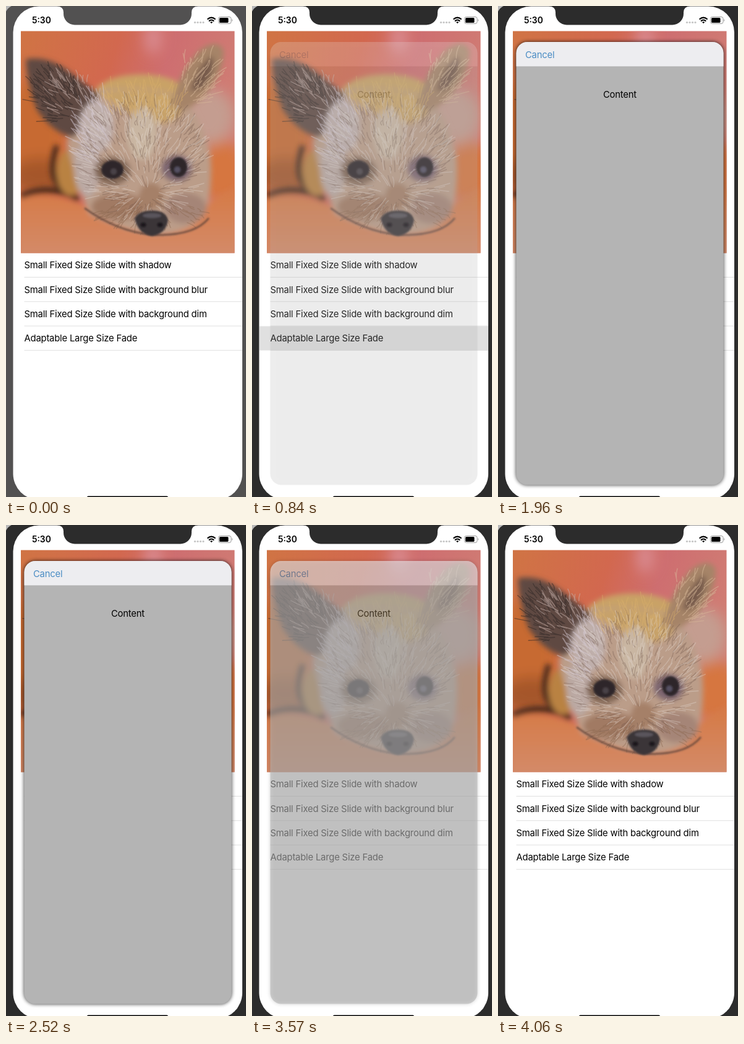
Recreate the animation shown at these times as an HTML page. Size 388 by 792 pixels, loop 4.13 s.

```html
<!DOCTYPE html>
<html lang="en">
<head>
<meta charset="utf-8">
<title>Modal fade</title>
<style>
html, body { margin: 0; width: 100%; height: 100%; overflow: hidden; background: #fff; }
svg { display: block; width: 388px; height: 792px; }
text { font: 14.8px Inter, Roboto, sans-serif; letter-spacing: -.19px; }
.clock { font-size: 13.8px; font-weight: 600; letter-spacing: 0; }
</style>
</head>
<body>
<svg viewBox="0 0 388 792">
  <defs>
    <filter id="soft" x="-30%" y="-30%" width="160%" height="160%"><feGaussianBlur stdDeviation="4"/></filter>
    <filter id="wide" x="-50%" y="-50%" width="200%" height="200%"><feGaussianBlur stdDeviation="11"/></filter>
    <filter id="edge"><feGaussianBlur stdDeviation="1.6"/></filter>
    <filter id="halo" x="-5%" y="-5%" width="110%" height="110%"><feGaussianBlur stdDeviation="3"/></filter>
    <linearGradient id="sofa" x2="1" y2=".35">
      <stop stop-color="#d07444"/><stop offset=".42" stop-color="#d2684f"/>
      <stop offset=".65" stop-color="#ce6e70"/><stop offset="1" stop-color="#d07e74"/>
    </linearGradient>
    <linearGradient id="blanket" x2="0" y2="1">
      <stop stop-color="#d67a45"/><stop offset="1" stop-color="#d38b6a"/>
    </linearGradient>
    <clipPath id="photo"><rect x="24" y="40.5" width="345.5" height="358"/></clipPath>
    <clipPath id="card"><rect x="29.5" y="58" width="335" height="714.5" rx="18"/></clipPath>
  </defs>

  <rect id="bezel" width="388" height="792"/>
  <path d="M0 0H9Q3 3 0 9Z" fill="#b9b9b9"/>
  <rect x="11.5" y=".5" width="370.5" height="796" rx="42" fill="#fff"/>
  <path id="notch" d="M82 0Q93 1 93 10V12A18 18 0 0 0 111 30.5H282A18 18 0 0 0 300 12V10Q300 1 311 0Z"/>

  <text class="clock" x="42" y="28">5:30</text>
  <g fill="#c4c4c4">
    <circle cx="305.5" cy="26.5" r="1.6"/><circle cx="310" cy="26.5" r="1.6"/>
    <circle cx="314.5" cy="26.5" r="1.6"/><circle cx="319" cy="26.5" r="1.6"/>
  </g>
  <g fill="none" stroke="#000" stroke-width="2">
    <path d="M325.6 21.6Q332 15.6 338.6 21.6M328 24.4Q332 20.6 336.3 24.4"/>
    <path d="M330 26L332.1 28.2L334.3 26Q332.1 24.4 330 26Z" fill="#000" stroke="none"/>
  </g>
  <rect x="343.5" y="17.5" width="20.5" height="11" rx="3" fill="none" stroke="#999"/>
  <rect x="345" y="19" width="14.5" height="8" rx="1.6"/>
  <path d="M365.3 21V25Q367.5 23 365.3 21Z" fill="#999"/>

  <g clip-path="url(#photo)">
    <rect x="24" y="40" width="346" height="359" fill="url(#sofa)"/>
    <g filter="url(#wide)">
      <ellipse cx="45" cy="205" rx="52" ry="85" fill="#c76a30"/>
      <ellipse cx="55" cy="275" rx="48" ry="30" fill="#a5562a"/>
      <ellipse cx="350" cy="268" rx="40" ry="50" fill="#d6763f"/>
      <ellipse cx="238" cy="52" rx="14" ry="26" fill="#d98a90"/>
      <ellipse cx="326" cy="178" rx="44" ry="46" fill="#c49d90"/>
    </g>
    <g filter="url(#soft)">
      <path d="M20 312Q70 296 135 326L330 318Q350 300 375 292V405H20Z" fill="url(#blanket)"/>
      <path d="M24 307Q70 284 118 312M82 225Q66 275 90 294" fill="none" stroke="#4a2a1b" stroke-width="9"/>
      <ellipse cx="105" cy="268" rx="23" ry="38" fill="#b98243"/>
      <ellipse cx="218" cy="144" rx="76" ry="34" fill="#c9a266"/>
      <path d="M135 140Q205 122 285 145Q320 185 330 240Q335 290 322 335Q295 368 240 368Q190 362 135 336Q112 280 98 222Q108 175 135 140Z" fill="#bb9d89"/>
      <path d="M150 142Q210 122 288 150Q290 190 240 190Q185 165 150 142Z" fill="#c7a26a"/>
      <path d="M32 86Q70 78 112 113L150 142Q140 182 108 212Q76 205 50 168Q34 128 32 86Z" fill="#5f4a43"/>
      <path d="M266 165Q276 112 312 72Q342 50 352 72Q351 108 331 132Q312 158 288 168Z" fill="#a68468"/>
      <path d="M298 138Q308 98 334 80Q340 106 318 132Z" fill="#765a4c"/>
      <ellipse cx="146" cy="195" rx="28" ry="42" fill="#bfafab"/>
      <ellipse cx="220" cy="206" rx="24" ry="42" fill="#c9b6a2"/>
      <ellipse cx="131" cy="262" rx="21" ry="46" fill="#bba9a3"/>
      <ellipse cx="172" cy="266" rx="29" ry="23" fill="#806553"/>
      <ellipse cx="276" cy="262" rx="25" ry="22" fill="#7c6570"/>
      <ellipse cx="182" cy="324" rx="44" ry="22" fill="#a17a63"/>
      <ellipse cx="290" cy="326" rx="34" ry="25" fill="#a58577"/>
      <ellipse cx="235" cy="307" rx="20" ry="22" fill="#a58068"/>
    </g>
    <g id="fur" fill="none" stroke-width="1.4" stroke-linecap="round"></g>
    <path d="M127 326Q180 364 236 369Q304 372 328 342" fill="none" stroke="#62453a" stroke-width="2.5" filter="url(#edge)"/>
    <g filter="url(#edge)" fill="#2f282a">
      <ellipse cx="172" cy="264" rx="18" ry="15"/>
      <ellipse cx="279" cy="260" rx="14" ry="16"/>
      <path d="M208 343Q214 330 237 330Q259 330 262 346Q258 368 236 371Q214 368 208 343Z" fill="#3a3439"/>
      <ellipse cx="222" cy="353" rx="5" ry="4" fill="#1c191c"/><ellipse cx="249" cy="353" rx="5" ry="4" fill="#1c191c"/>
      <ellipse cx="236" cy="338" rx="15" ry="4" fill="#5a555b"/>
      <circle cx="174" cy="267" r="5" fill="#4a4347"/><circle cx="277" cy="264" r="5" fill="#545062"/>
    </g>
  </g>

  <rect id="press" x="12" y="516.5" width="370" height="39" fill="#d9d9d9"/>
  <g id="rows"></g>
  <rect x="131" y="790.5" width="131" height="4" rx="2"/>

  <rect id="shade" x="29.5" y="58" width="335" height="714.5" rx="18" filter="url(#halo)"/>
  <g id="modal">
    <g clip-path="url(#card)">
      <rect x="29" y="58" width="336" height="715" fill="#b4b4b4"/>
      <rect x="29" y="58" width="336" height="39.3" fill="#ededf0"/>
    </g>
    <text x="44" y="83.5" fill="#4a8cc4">Cancel</text>
    <text x="197" y="148" text-anchor="middle">Content</text>
  </g>
</svg>
<script>
const LOOP = 4130, STEP = 70;
const $ = id => document.getElementById(id);

$('rows').innerHTML = [
  'Small Fixed Size Slide with shadow',
  'Small Fixed Size Slide with background blur',
  'Small Fixed Size Slide with background dim',
  'Adaptable Large Size Fade'
].map((label, i) => {
  const y = 39.3 * i;
  return `<text x="29.5" y="${423.3 + y}">${label}</text>
    <path d="M29.5 ${437.5 + y}H382" stroke="#e0e0e0"/>`;
}).join('');

let seed = 7;
const rand = () => (seed = seed * 16807 % 2147483647) / 2147483647;

// Seeded hairs inside an ellipse, fanning out from the root point
function hairs(color, count, [cx, cy, rx, ry], [rootX, rootY], length) {
  let d = '';
  for (let i = 0; i < count; i++) {
    const turn = rand() * Math.PI * 2, reach = Math.sqrt(rand());
    const x = cx + Math.cos(turn) * rx * reach, y = cy + Math.sin(turn) * ry * reach;
    const angle = Math.atan2(y - rootY, x - rootX) + (rand() - .5) * .7;
    const size = length * (.4 + rand()), bend = (rand() - .5) * 8;
    const dx = Math.cos(angle) * size, dy = Math.sin(angle) * size;
    d += `M${x} ${y}q${dx / 2 + bend} ${dy / 2} ${dx} ${dy}`;
  }
  $('fur').innerHTML += `<path d="${d}" stroke="${color}"/>`;
}
const nose = [228, 300], face = [218, 245, 98, 92];
hairs('#6f564a58', 230, face, nose, 17);
hairs('#e6dcd658', 260, face, nose, 20);
hairs('#d9b06c70', 90, [220, 155, 66, 28], nose, 20);
hairs('#d8cfd878', 70, [142, 195, 28, 60], nose, 22);
hairs('#8c674e70', 90, [235, 335, 88, 20], [235, 300], 13);
hairs('#2f262580', 90, [82, 145, 38, 42], [130, 190], 18);
hairs('#c9b3ad80', 40, [108, 145, 36, 36], [140, 180], 20);
hairs('#d9b99a80', 60, [312, 115, 28, 42], [280, 170], 18);

function ramp(t, start, duration) {
  const x = Math.min(1, Math.max(0, (t - start) / duration));
  return x * x * (3 - 2 * x);
}

function draw(now) {
  const t = Math.floor(now % LOOP / STEP) * STEP;
  const alpha = ramp(t, 735, 350) - ramp(t, 3418, 350);
  const body = t < 630 ? '#525151' : '#2c2c2c';
  $('bezel').setAttribute('fill', body);
  $('notch').setAttribute('fill', body);
  $('press').setAttribute('opacity', t < 630 ? 0 : 1 - ramp(t, 770, 240));
  $('shade').setAttribute('opacity', .8 * alpha ** 3);
  $('modal').setAttribute('opacity', alpha);
  requestAnimationFrame(draw);
}
requestAnimationFrame(draw);
</script>
</body>
</html>
```
